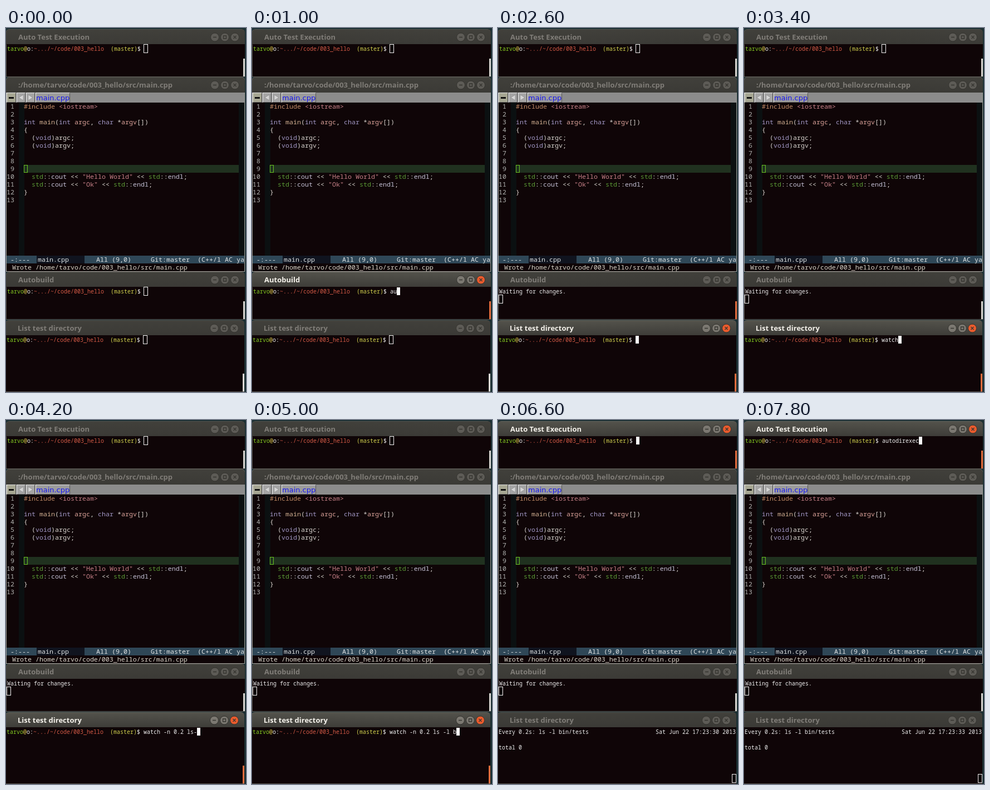
Write an HTML page that moves like this. It is 431 by 654 pixels and loops after 8 s.

```html
<!DOCTYPE html>
<html lang="en">
<head>
<meta charset="utf-8">
<title>Terminal session</title>
<style>
html, body { margin: 0; width: 100%; height: 100%; overflow: hidden; background: #1b2f33; }
#stage { position: relative; width: 431px; height: 654px; overflow: hidden; }
#stage div, #stage svg, .cur { position: absolute; box-sizing: border-box; }
.win { width: 429px; background: #0f0507; border: 1px solid #55534f; border-width: 0 0 1px 1px;
  border-radius: 6px 6px 0 0;
  --knob: #5d5b56; --rim: #34332f; --mark: #35342f; --close: #5d5b56; }
.bar { left: -1px; top: 0; width: 429px; height: 28px; border-radius: 6px 6px 0 0; border-top: 1px solid #55544e;
  background: linear-gradient(#41403b, #3b3a36); color: #807d78;
  font: bold 13px/26px "Open Sans", "Noto Sans", sans-serif; padding-left: 22px; white-space: pre; }
.bar svg { left: 364px; top: 3px; width: 58px; height: 22px; }
.focus { --knob: #7b7871; --close: #ea5b2d; --rim: #32312d; }
.focus .bar { background: linear-gradient(#53524b, #3d3c38); color: #f4f1ea; border-top-color: #68675f; }
.term { left: 0; top: 27px; right: 0; bottom: 0; overflow: hidden; color: #eee; background: #0f0507;
  font: 10px/14px "Noto Sans Mono", "DejaVu Sans Mono", monospace; white-space: pre; }
.text { left: 1px; top: 1px; }
.right { right: 1px; top: 1px; }
/* The hollow cursor sits one pixel outside its cell, the solid one fills it */
.cur { width: 8px; height: 16px; margin: -1px; border: 1px solid #f4f4f4; }
.focus .cur { width: 6px; height: 14px; margin: 0; background: #f8f8f8; }
.thumb { right: 0; bottom: 0; width: 3px; height: 32px; background: #dcdad5; }
.hot { background: #e66c3c; }
.user { color: #86cb22; } .at { color: #d6c34a; } .path { color: #d35a46; } .git { color: #d0d04e; }

.editor { border-color: #a3a19c; border-right-width: 1px; }
.tabs { left: 0; top: 28px; width: 427px; height: 18px; background: #8c8c8c; }
.tabs div { top: 0; height: 18px; border: 1px solid #e4e4e4; border-right-color: #555; border-bottom-color: #555; }
.tabs svg { left: 0; top: 0; }
.tabs .tab { left: 52px; width: 62px; background: #9c9c9c; color: #1717f0;
  font: 13px/17px "DejaVu Sans", Roboto, sans-serif; }
.edit { left: 0; top: 46px; width: 427px; height: 303px; overflow: hidden; color: #d8d4cf;
  font: 11.667px/14px "Noto Sans Mono", "DejaVu Sans Mono", monospace; white-space: pre; }
.edit .fringe { left: 22px; top: 0; width: 10px; height: 275px; background: #0b1011; }
.edit .end { left: 417px; }
.edit .nums { left: 0; top: 0; width: 14px; text-align: right; color: #b2b3b1; }
.edit .line { left: 31px; top: 112px; width: 386px; height: 14px; background: #20311f; }
.edit .caret { left: 31px; top: 112px; width: 7px; height: 14px; border: 1px solid #68c322; }
.edit .code { left: 31px; top: 0; }
.mode { left: 0; top: 275px; width: 427px; height: 14px; background: #2f4757; color: #dfe3e4; }
.mode div { top: 0; height: 14px; }
.mini { left: 10px; top: 289px; color: #dcd8cc; }
.pre { color: #c28c68; } .str { color: #c98289; } .type { color: #a398c6; } .arg { color: #dba29a; }
.fn { color: #d0ae90; } .ns { color: #5b9a35; } .mem { color: #c4c0d4; }
</style>
</head>
<body>
<div id="stage">
  <svg width="0" height="0">
    <symbol id="knobs" viewBox="0 0 58 22">
      <g stroke="var(--rim)">
        <circle cx="11" cy="10.500" r="7.500" fill="var(--knob)"/>
        <circle cx="29" cy="10.500" r="7.500" fill="var(--knob)"/>
        <circle cx="47" cy="10.500" r="7.500" fill="var(--close)"/>
      </g>
      <path d="M8 10.500h6M26.500 8h5v5h-5zM44.500 8l5 5m0-5l-5 5" fill="none" stroke="var(--mark)" stroke-width="1.300"/>
    </symbol>
  </svg>

  <div class="win" id="run" style="left:0;top:2px;height:86px">
    <div class="bar">Auto Test Execution<svg><use href="#knobs"/></svg></div>
    <div class="term"></div>
  </div>

  <div class="win editor" style="left:0;top:88px;height:350px">
    <div class="bar">:/home/tarvo/code/003_hello/src/main.cpp<svg><use href="#knobs"/></svg></div>
    <div class="tabs">
      <div style="left:0;width:17px;background:#a7a793"></div>
      <div style="left:18px;width:16px;background:#a5a5a5"></div>
      <div style="left:35px;width:16px;background:#a5a5a5"></div>
      <svg width="52" height="18">
        <path d="M4 8h9v3h-9z" fill="#111"/>
        <path d="M30 4v10l-8-5zM39 4v10l8-5z" fill="#d5d5d5" stroke="#858585" stroke-width=".6"/>
      </svg>
      <div class="tab">main.cpp</div>
    </div>
    <div class="edit">
      <div class="fringe"></div>
      <div class="fringe end"></div>
      <div class="nums">1
2
3
4
5
6
7
8
9
10
11
12
13</div>
      <div class="line"></div>
      <div class="code"><span class="pre">#include</span> <span class="str">&lt;iostream&gt;</span>

<span class="type">int</span> <span class="fn">main</span>(<span class="type">int</span> <span class="arg">argc</span>, <span class="type">char</span> *<span class="arg">argv</span>[])
{
  (<span class="type">void</span>)argc;
  (<span class="type">void</span>)argv;



  <span class="ns">std</span>::<span class="mem">cout</span> &lt;&lt; <span class="str">"Hello World"</span> &lt;&lt; <span class="ns">std</span>::<span class="mem">endl</span>;
  <span class="ns">std</span>::<span class="mem">cout</span> &lt;&lt; <span class="str">"Ok"</span> &lt;&lt; <span class="ns">std</span>::<span class="mem">endl</span>;
}</div>
      <div class="caret"></div>
      <div class="mode">
        <div style="left:7px">-:---</div>
        <div style="left:54px;width:86px;background:#10141f;padding-left:2px">main.cpp</div>
        <div style="left:161px">All (9,0)</div>
        <div style="left:259px">Git:master</div>
        <div style="left:343px">(C++/l AC ya</div>
      </div>
      <div class="mini">Wrote /home/tarvo/code/003_hello/src/main.cpp</div>
    </div>
  </div>

  <div class="win" id="build" style="left:0;top:438px;height:86px">
    <div class="bar">Autobuild<svg><use href="#knobs"/></svg></div>
    <div class="term"></div>
  </div>

  <div class="win" id="list" style="left:-1px;top:525px;height:129px">
    <div class="bar">List test directory<svg><use href="#knobs"/></svg></div>
    <div class="term"></div>
  </div>
</div>

<script>
const LOOP = 8000, STEP = 200;
const PROMPT = '<span class="user">tarvo</span><span class="at">@</span>o:' +
  '<span class="path">~.../~/code/003_hello</span>  <span class="git">(master)</span>$ ';
const CURSOR = '<span class="cur"></span>';
const WATCH = 'watch -n 0.2 ls -l bin/tests';

// Latest value whose start time has passed
const at = (keys, t) => keys.reduce((value, key) => key[0] <= t ? key[1] : value, keys[0][1]);
const typed = (text, keys, t) => text.slice(0, at(keys, t));

const focusKeys = [[0, ''], [400, 'build'], [2400, 'list'], [6400, 'run']];
const runKeys = [[0, 0], [6800, 1], [7000, 3], [7200, 5], [7400, 7], [7600, 9], [7800, 11]];
const buildKeys = [[0, 0], [800, 1], [1000, 2], [1200, 4], [1400, 6], [1600, 9]];
const listKeys = [[0, 0], [3000, 1], [3200, 3], [3400, 5], [3600, 8], [3800, 11], [4000, 14],
  [4400, 15], [4600, 18], [5000, 20], [5200, 22], [5400, 24], [5600, 26], [5800, 28]];

const text = body => `<div class="text">${body}</div>`;
const thumb = hot => `<div class="thumb${hot ? ' hot' : ''}"></div>`;
const shell = cmd => text(PROMPT + cmd + CURSOR);

function watchScreen(t) {
  const sec = 30 + Math.floor((t - 6600) / 400);
  return text('Every 0.2s: ls -l bin/tests\n\ntotal 0\n\n\n\n' + ' '.repeat(70) + CURSOR) +
    `<div class="right">Sat Jun 22 17:23:${sec} 2013</div>`;
}

function views(t) {
  const focus = at(focusKeys, t);
  const listCmd = t >= 4200 && t < 4400 ? 'watch -n 0.2 ls-' : typed(WATCH, listKeys, t);
  const buildBody = t < 2200 ? shell(typed('autobuild', buildKeys, t))
    : text('Waiting for changes.\n' + CURSOR);
  return {
    focus,
    run: shell(typed('autodirexec', runKeys, t)) + thumb(focus === 'run'),
    build: buildBody + thumb(t >= 400 && t < 2800),
    list: t < 6000 ? shell(listCmd) + thumb(focus === 'list') : watchScreen(t)
  };
}

function draw(t) {
  const view = views(t);
  for (const id of ['run', 'build', 'list']) {
    const win = document.getElementById(id);
    win.classList.toggle('focus', view.focus === id);
    win.querySelector('.term').innerHTML = view[id];
  }
}

let start, shown = -1;
function tick(now) {
  start ??= now;
  const t = Math.floor(((now - start) % LOOP) / STEP) * STEP;
  if (t !== shown) draw(shown = t);
  requestAnimationFrame(tick);
}
draw(0);
requestAnimationFrame(tick);
</script>
</body>
</html>
```
